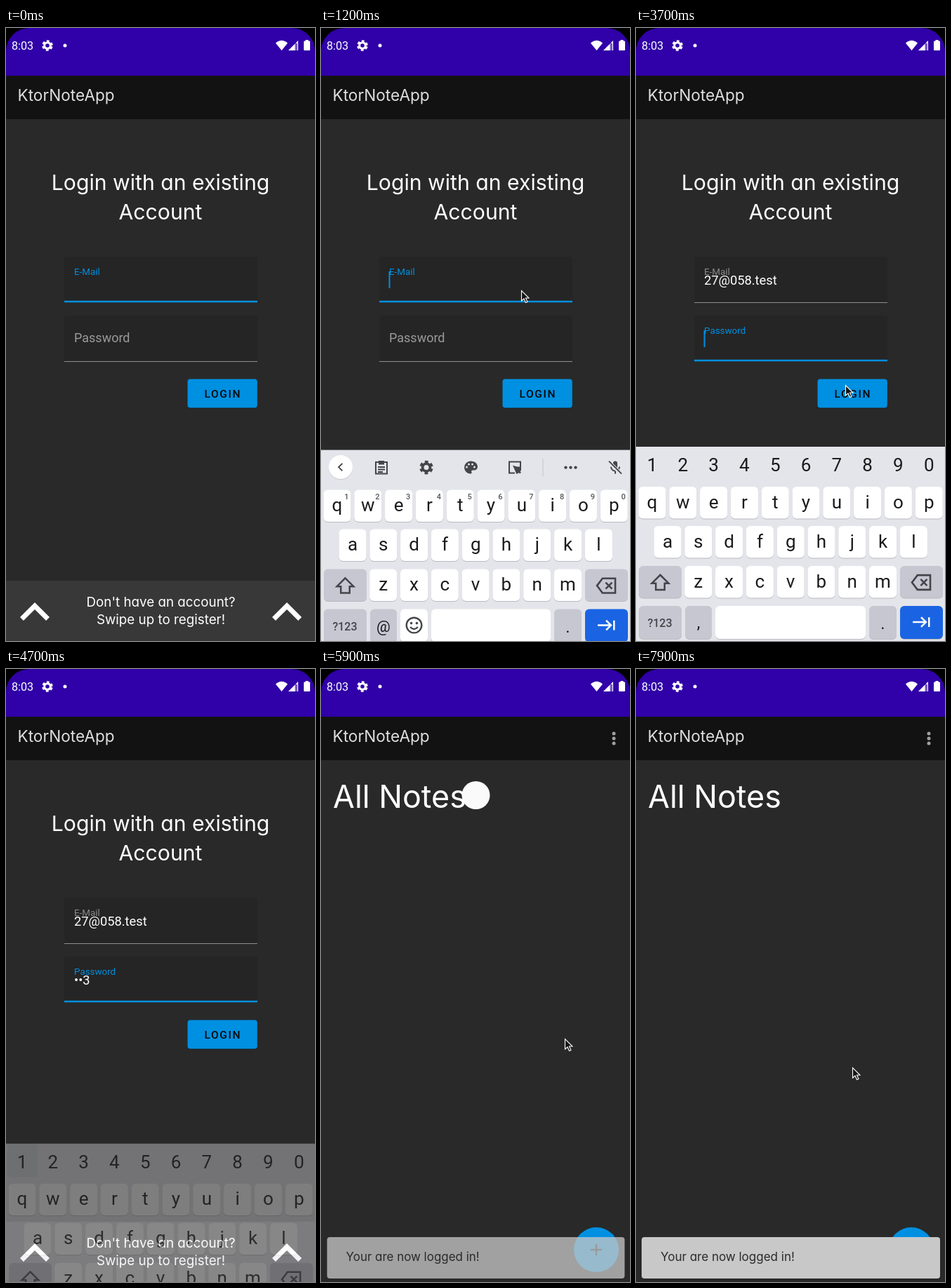
Write an HTML page that moves like this. It is 440x874 px and loops after 8000 ms.

```html
<!DOCTYPE html>
<html lang="en">
<head>
<meta charset="utf-8">
<title>Login flow</title>
<style>
html, body { margin: 0; width: 100%; height: 100%; overflow: hidden; background: #000; }
svg { display: block; width: 100%; height: 100%; font-family: Roboto, sans-serif; }
.geo { font-family: Inter, sans-serif; font-feature-settings: "cv11"; }
.mid { text-anchor: middle; }
.line { fill: none; stroke: currentColor; stroke-width: 2; }
</style>
</head>
<body>
<svg id="stage" viewBox="0 0 440 874"></svg>
<script>
const LOOP = 8000;
const BLUE = '#0090e1', GREY = '#8f8f8f', INK = '#444549';
const EMAIL = '27@058.test', PASSWORD = '123';
const EMAIL_KEYS = [1800, 1900, 2100, 2300, 2600, 2600, 2700, 2800, 3000, 3100, 3300];
const PASSWORD_KEYS = [3900, 4100, 4200];
const FOCUS_PASSWORD = 3500, NAVIGATE = 5700;
// time, x, y
const POINTER = [
  [100, 1, 510], [900, 285, 374], [1400, 285, 374], [1600, 286, 372], [3450, 286, 372],
  [3700, 298, 509], [4900, 298, 509], [5400, 347, 527], [6550, 347, 527],
  [7100, 319, 582], [7700, 319, 582], [7880, 308, 568]
];

const clamp = v => Math.max(0, Math.min(1, v));
const progress = (t, start, length) => clamp((t - start) / length);
const easeOut = (p, power = 3) => 1 - (1 - p) ** power;
const mix = (a, b, p) => a + (b - a) * p;
const $ = id => document.getElementById(id);
const set = (id, attrs) => {
  for (const name in attrs) $(id).setAttribute(name, attrs[name]);
};
const show = (id, on) => set(id, { display: on ? 'inline' : 'none' });

const rect = (x, y, w, h, fill, r = 0, extra = '') =>
  `<rect x="${x}" y="${y}" width="${w}" height="${h}" rx="${r}" fill="${fill}" ${extra}/>`;
const text = (x, y, size, fill, label, extra = '') =>
  `<text x="${x}" y="${y}" font-size="${size}" fill="${fill}" ${extra}>${label}</text>`;
const circle = (x, y, r, fill, extra = '') =>
  `<circle cx="${x}" cy="${y}" r="${r}" fill="${fill}" ${extra}/>`;
// Icons are drawn on a 24 unit grid around their centre.
const icon = (x, y, scale, color, body) =>
  `<g transform="translate(${x} ${y}) scale(${scale}) translate(-12 -12)" color="${color}" fill="${color}">${body}</g>`;
const line = d => `<path class="line" d="${d}"/>`;
const GEAR = circle(12, 12, 5.4, 'none', 'stroke="currentColor" stroke-width="3.8"') +
  circle(12, 12, 8, 'none', 'stroke="currentColor" stroke-width="3.6" stroke-dasharray="4.6 3.778" stroke-dashoffset="-1.89"');
const CHEVRON = '<path d="M7.41 15.41L12 10.83l4.59 4.58L18 14l-6-6-6 6z"/>';

function statusBar() {
  return `<path fill="#3000a8" d="M0 68V33A33 33 0 0 1 33 0H407A33 33 0 0 1 440 33V68z"/>` +
    text(8, 31, 16.2, '#fff', '8:03') + icon(59, 25, .8, '#fff', GEAR) + circle(84, 25, 2.5, '#fff') +
    `<path fill="#fff" d="M392.500 32L384 21.500Q392.500 14 401 21.500z"/>
     <path fill="#fff" fill-opacity=".35" d="M402 32L416 18V32z"/>
     <path fill="#fff" d="M402 32L411.500 22.500V32zM412.500 21.500L416 18V32H415V22z"/>` +
    rect(424, 18.500, 9, 13.500, '#fff', 1) + rect(426.500, 17, 4, 2, '#fff');
}

function field(name, y, label) {
  return `<path fill="#252525" d="M83 ${y + 65}V${y + 4}q0-4 4-4H354q4 0 4 4V${y + 65}z"/>` +
    rect(83, 0, 275, 1, GREY, 0, `id="${name}Line"`) +
    text(97, y + 26, 13.4, GREY, label, `id="${name}Label"`) +
    text(97, y + 40, 18.3, '#fff', '', `id="${name}Text"`);
}

function loginScreen() {
  const heading = (y, label) => text(220, y, 30.2, '#fff', label, 'class="geo mid"');
  const hint = (y, label) => text(220.5, y, 18.8, '#fff', label, 'class="geo mid"');
  return heading(231, 'Login with an existing') + heading(273, 'Account') +
    field('email', 326, 'E-Mail') + field('password', 410, 'Password') +
    rect(96.500, 347, 2, 24, BLUE, 0, 'id="caret"') +
    rect(258.5, 501.5, 99.3, 41, '#1f1f1f', 4) + rect(258.5, 500.5, 99.3, 41, BLUE, 4) +
    rect(258.5, 500.5, 99.3, 41, '#fff', 4, 'id="ripple"') +
    text(282.500, 527, 15.5, '#080808', 'LOGIN', 'font-weight="500" letter-spacing="1.6"') +
    rect(0, 788, 440, 86, '#383838') + hint(825, "Don't have an account?") + hint(850, 'Swipe up to register!') +
    [41, 400].map(x => icon(x, 833, 3.5, '#fff', CHEVRON)).join('');
}

function notesScreen() {
  return [92, 99, 106].map(y => circle(417, y, 2.5, '#a0a0a0')).join('') +
    text(17, 198, 44.8, '#fff', 'All Notes', 'class="geo"') +
    circle(392, 828, 32, BLUE) + '<path d="M384 828h16M392 820v16" stroke="#111" stroke-width="2.4"/>' +
    `<g id="spinner">${circle(0, 0, 20, '#fafafa')}</g>
     <g id="snackbar">${rect(8, 810, 425, 59, '#c8c8c8', 4)}${text(35, 844, 17, '#2b2b2b', 'Your are now logged in!', 'class="geo"')}</g>`;
}

// The keyboard's own origin is its top edge.
function keyboard() {
  const key = (x, y, w, fill = '#fff', h = 45.5) =>
    rect(x, y + 1, w, h, '#b9bac1', 6) + rect(x, y, w, h, fill, 6);
  const bottomKey = (x, w, fill) => key(x, 227, w, fill, 47);
  const letter = (x, y, label, size = 26) => text(x, y, size, '#1b1b1d', label, 'class="mid"');
  const row = (letters, x, y) => [...letters].map((c, i) => {
    const cx = x + i * 43.8;
    return key(cx - 19.5, y, 39) + letter(cx, y + 30.500, c);
  }).join('');
  const digits = [...'1234567890'];
  const column = i => 23 + i * 43.8;
  const SOFT = '#c6c7d1';

  const toolbar = circle(28, 25.500, 17, '#c9cad0') + circle(28, 24.500, 17, '#fff') +
    icon(28, 24.500, .95, INK, line('M14.500 6.500L9 12l5.500 5.500')) +
    icon(86, 25, 1, INK, line('M4 4.500H20V21H4z') + '<path d="M8 2.500h8V8H8zM7 10.500h10v2H7zM7 14h10v2H7zM7 17.300h7v2H7z"/>') +
    icon(150, 25, 1, INK, GEAR) +
    icon(213, 25, 1, INK, '<path d="M12 3a9 9 0 0 0 0 18c1.500 0 2-1.200 1.400-2.300-.7-1.400.1-2.700 1.600-2.700h2a5 5 0 0 0 5-5c0-4.400-4-8-10-8z"/>' +
      [[6.5, 11.5], [9.5, 7.5], [14.5, 7.5], [17.5, 11.5]].map(([x, y]) => circle(x, y, 1.5, '#e4e5ea')).join('')) +
    icon(276, 25, 1, INK, line('M12 20H4V4H20V12') + '<path d="M9 9l4 9 2-2 4 5 2-2-4-4 3-2z"/><path d="M11 11H21V16L16 21H14z"/>') +
    rect(315.500, 12, 1, 26, '#c4c5ca') +
    [348.500, 355.500, 362.500].map(x => circle(x, 25, 2.2, INK)).join('') +
    icon(419, 25, 1, INK, rect(9, 3, 6, 11, 'currentColor', 3) + line('M6 11a6 6 0 0 0 12 0M12 17v4') +
      '<path d="M3 4L20 21" stroke="#e4e5ea" stroke-width="5"/>' + line('M3 3L21 21'));
  const hints = digits.map((d, i) => text(column(i) + 13.500, 70, 11, '#55565a', d, 'class="mid" font-weight="500"')).join('');

  return rect(0, 0, 440, 300, '#e4e5ea') +
    row('qwertyuiop', 23, 57) + row('asdfghjkl', 45, 113) + row('zxcvbnm', 88.700, 170) +
    key(4, 170, 61, SOFT) + key(376, 170, 61, SOFT) +
    icon(34.500, 194, 1.25, INK, line('M12 3L21.500 12.500H17V20H7V12.500H2.500z')) +
    icon(406, 193.500, 1.3, INK, line('M8 4H22V20H8L2 12zM11.500 8.500l7 7M18.500 8.500l-7 7')) +
    bottomKey(4, 61, SOFT) + text(34, 257, 16, INK, '?123', 'class="mid" font-weight="500"') +
    bottomKey(70, 38, SOFT) + bottomKey(332, 39, SOFT) + letter(351.500, 260, '.', 24) +
    bottomKey(376, 61, '#1a64e3') + icon(406, 250, 1.25, '#fff', line('M2.500 12H17M12 6.500l5.500 5.500-5.500 5.500M21 6.500V17.500')) +
    `<g id="emailKeys">${toolbar}${hints}${letter(89, 259, '@', 22)}${bottomKey(113, 39)}${bottomKey(157, 170)}` +
    icon(132.500, 250, 1.2, INK, circle(12, 12, 9, 'none', 'stroke="currentColor" stroke-width="2"') +
      circle(8.7, 9.5, 1.5, INK) + circle(15.3, 9.5, 1.5, INK) + line('M7.500 14q4.500 5 9 0')) +
    `</g><g id="passwordKeys">${rect(2, 0, 43, 48, '#000', 4, 'id="pressed" opacity=".05"')}` +
    digits.map((d, i) => letter(column(i), 35, d)).join('') + letter(89, 259, ',', 23) + bottomKey(113, 214) + '</g>';
}

$('stage').innerHTML = rect(0, 0, 440, 874, '#000') + statusBar() +
  rect(0, 68, 440, 62, '#121212') + text(16.500, 104, 22.6, '#dedede', 'KtorNoteApp', 'class="geo"') +
  rect(0, 130, 440, 744, '#292929') +
  `<g id="login">${loginScreen()}</g><g id="notes">${notesScreen()}</g><g id="keyboard">${keyboard()}</g>
   <path id="pointer" fill="#151515" stroke="#fff" stroke-width="1.1" d="M.5 .5V15L4 12L6.500 17.500L9 16.400L6.500 11H11z"/>`;

const typed = (keys, t) => keys.filter(k => t >= k).length;

function drawFocus(name, y, on) {
  set(name + 'Line', { y: on ? y + 62.8 : y + 65, height: on ? 2.5 : 1, fill: on ? BLUE : GREY });
  set(name + 'Label', { fill: on ? BLUE : '#8b8b8b' });
}

function drawForm(t) {
  const onPassword = t >= FOCUS_PASSWORD;
  drawFocus('email', 326, !onPassword);
  drawFocus('password', 410, onPassword);
  const float = easeOut(progress(t, FOCUS_PASSWORD, 167));
  set('passwordLabel', { y: mix(448, 436, float), 'font-size': mix(18, 13.4, float) });
  if (!onPassword) set('passwordLabel', { fill: '#9a9a9a' });

  $('emailText').textContent = EMAIL.slice(0, typed(EMAIL_KEYS, t));
  const count = typed(PASSWORD_KEYS, t);
  $('passwordText').textContent = count ? '•'.repeat(count - 1) + PASSWORD[count - 1] : '';

  // The caret restarts its blink after every key or focus change.
  const events = [500, 1000, ...EMAIL_KEYS, FOCUS_PASSWORD, ...PASSWORD_KEYS].filter(e => e <= t);
  const since = t - events[events.length - 1];
  const width = $(onPassword ? 'passwordText' : 'emailText').getComputedTextLength();
  set('caret', { x: 96.5 + width, y: onPassword ? 431 : 347 });
  show('caret', events.length && since % 1000 < 500);

  const press = progress(t, 5480, 220);
  set('ripple', { opacity: press < 1 ? Math.sin(press * Math.PI) * .22 : 0 });
}

function drawKeyboard(t) {
  const rise = progress(t, 990, 275), fall = progress(t, 4550, 250);
  const shift = 85 * (1 - easeOut(rise, 2)) + 85 * easeOut(fall);
  show('keyboard', rise > 0 && fall < 1);
  set('keyboard', { transform: `translate(0 ${597 + shift})`, opacity: Math.min(1, rise * 1.5) * (1 - fall) });
  show('emailKeys', t < FOCUS_PASSWORD + 100);
  show('passwordKeys', t >= FOCUS_PASSWORD + 100);
  show('pressed', t >= 4400);
}

function drawNotes(t) {
  const size = easeOut(progress(t, NAVIGATE, 150)) * (1 - progress(t, 5950, 150));
  set('spinner', { transform: `translate(220.5 180) scale(${size})` });
  const p = progress(t, 5780, 160), scale = mix(.8, 1, easeOut(p));
  set('snackbar', { opacity: p, transform: `translate(220.5 839.5) scale(${scale}) translate(-220.5 -839.5)` });
}

function drawPointer(t) {
  let i = POINTER.findIndex(point => point[0] > t);
  if (i < 0) i = POINTER.length - 1;
  const from = POINTER[Math.max(0, i - 1)], to = POINTER[i];
  const p = progress(t, from[0], to[0] - from[0] || 1);
  const ease = p * p * (3 - 2 * p);
  set('pointer', { transform: `translate(${mix(from[1], to[1], ease)} ${mix(from[2], to[2], ease)})` });
  show('pointer', t >= 100 && !(t >= 4300 && t < 4900));
}

function render(t) {
  const loggedIn = t >= NAVIGATE;
  show('login', !loggedIn);
  show('notes', loggedIn);
  if (loggedIn) drawNotes(t); else drawForm(t);
  drawKeyboard(t);
  drawPointer(t);
}

const begin = performance.now();
function tick() {
  render((performance.now() - begin) % LOOP);
  requestAnimationFrame(tick);
}
tick();
</script>
</body>
</html>
```
